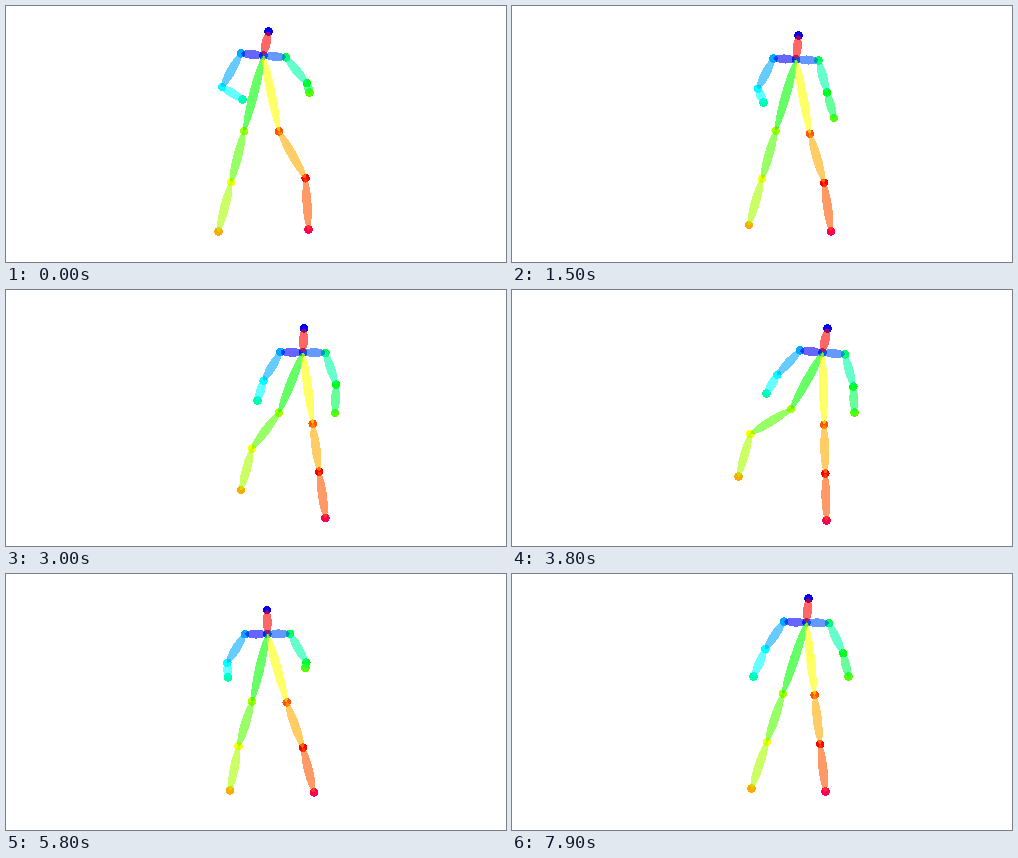
These frames come from a looping animation (500 px wide and 256 px high, 8 s). An HTML page:

```html
<!DOCTYPE html>
<html lang="en">
<head>
<meta charset="utf-8">
<title>Moving stick figure</title>
<style>
  html, body { margin: 0; width: 100%; height: 100%; overflow: hidden; background: #fff; }
  svg { display: block; shape-rendering: crispEdges; }
</style>
</head>
<body>
<svg id="stage" width="500" height="256" viewBox="-0.5 -0.5 500 256"></svg>
<script>
const stage = document.getElementById('stage');
const LOOP = 8000, STEP = 100;

// The body follows the neck, hands and feet; elbows and knees bend outwards
const body = (x, y, lean) => [x, y, lean];
const hand = (x, y, bend = 3) => [x, y, bend];
const foot = (x, y, bend = 0) => [x, y, bend];

// Each pose: neck, right hand, left hand, right foot, left foot
const poses = [
  { at: 0, parts: [body(257, 49, 5), hand(236, 93, 20), hand(303, 86), foot(212, 225), foot(302, 223, 10)] },
  { at: 800, parts: [body(284, 44, 8), hand(254, 75, 14), hand(328, 100, -8), foot(230, 224), foot(313, 225, 6)] },
  { at: 2200, parts: [body(283, 62, -3), hand(248, 117), hand(315, 123, 8), foot(243, 213), foot(324, 225)] },
  { at: 3800, parts: [body(310, 62, 5), hand(254, 103), hand(342, 122), foot(226, 186, 14), foot(314, 230)] },
  { at: 4900, parts: [body(221, 72, -4), hand(187, 114), hand(258, 115), foot(205, 220, 4), foot(301, 214, 4)] },
  { at: 6700, parts: [body(301, 47, 3), hand(256, 92, 9), hand(340, 72), foot(242, 212), foot(314, 222)] },
  { at: 7900, parts: [body(294, 48, 2), hand(241, 102), hand(336, 102), foot(239, 214), foot(313, 217)] }
];

// Joints: 0 nose, 1 neck, 2-4 right arm, 5-7 left arm, 8-10 right leg, 11-13 left leg
const chain = first => [[first, first + 1], [first + 1, first + 2]];
const limbs = [[1, 2], [1, 5], ...chain(2), ...chain(5),
  [1, 8], ...chain(8), [1, 11], ...chain(11), [1, 0]];

// Blue to red in steps of a third of a primary
function hue(i) {
  const clamp = v => Math.max(0, Math.min(255, v));
  const r = clamp((i - 6) * 85);
  const g = clamp(i < 6 ? i * 85 : (12 - i) * 85);
  const b = i > 12 ? 85 : clamp((6 - i) * 85);
  return `rgb(${r},${g},${b})`;
}

function blend(t) {
  const next = Math.max(1, poses.findIndex(p => p.at >= t));
  const a = poses[next - 1], b = poses[next];
  const u = (t - a.at) / (b.at - a.at), ease = u * u * (3 - 2 * u);
  return a.parts.map((part, i) => part.map((v, k) => v + (b.parts[i][k] - v) * ease));
}

// A point at a share of the way to the end, pushed sideways
function along([x, y], [endX, endY], share, push) {
  const dx = endX - x, dy = endY - y, length = Math.hypot(dx, dy);
  return [x + dx * share + dy / length * push, y + dy * share - dx / length * push];
}

function arm([x, y, lean], wrist, side) {
  const shoulder = [x + side * 22.5, y + side * lean * 0.4];
  const reach = Math.hypot(wrist[0] - shoulder[0], wrist[1] - shoulder[1]);
  const elbow = along(shoulder, wrist, Math.min(1, 33 / reach), side * wrist[2]);
  return [shoulder, elbow, wrist];
}

function leg(neck, ankle, side) {
  const push = side * ankle[2];
  return [along(neck, ankle, 0.43, -0.4 * push), along(neck, ankle, 0.72, push), ankle];
}

function figureAt(t) {
  const [neck, handR, handL, footR, footL] = blend(t);
  const nose = [neck[0] + neck[2], neck[1] - 24];
  return [nose, neck, ...arm(neck, handR, -1), ...arm(neck, handL, 1),
    ...leg(neck, footR, -1), ...leg(neck, footL, 1)];
}

function setAttributes(node, values) {
  for (const name in values) node.setAttribute(name, values[name]);
}

function add(tag, values) {
  const node = document.createElementNS('http://www.w3.org/2000/svg', tag);
  setAttributes(node, values);
  return stage.appendChild(node);
}

const dots = Array.from({ length: 14 }, (_, i) => add('circle', { r: 4.3, fill: hue(i) }));
const bones = limbs.map((_, i) => add('ellipse', { ry: 4.5, fill: hue(i), 'fill-opacity': 0.6 }));

function draw(t) {
  const joints = figureAt(t);
  joints.forEach(([cx, cy], i) => setAttributes(dots[i], { cx, cy }));
  limbs.forEach(([from, to], i) => {
    const [x1, y1] = joints[from], [x2, y2] = joints[to];
    const angle = Math.atan2(y2 - y1, x2 - x1) * 180 / Math.PI;
    setAttributes(bones[i], {
      rx: Math.hypot(x2 - x1, y2 - y1) / 2,
      transform: `translate(${(x1 + x2) / 2} ${(y1 + y2) / 2}) rotate(${angle})`
    });
  });
}

function tick() {
  const t = performance.now() % LOOP;
  draw(Math.floor(t / STEP) * STEP);
  requestAnimationFrame(tick);
}
tick();
</script>
</body>
</html>
```
